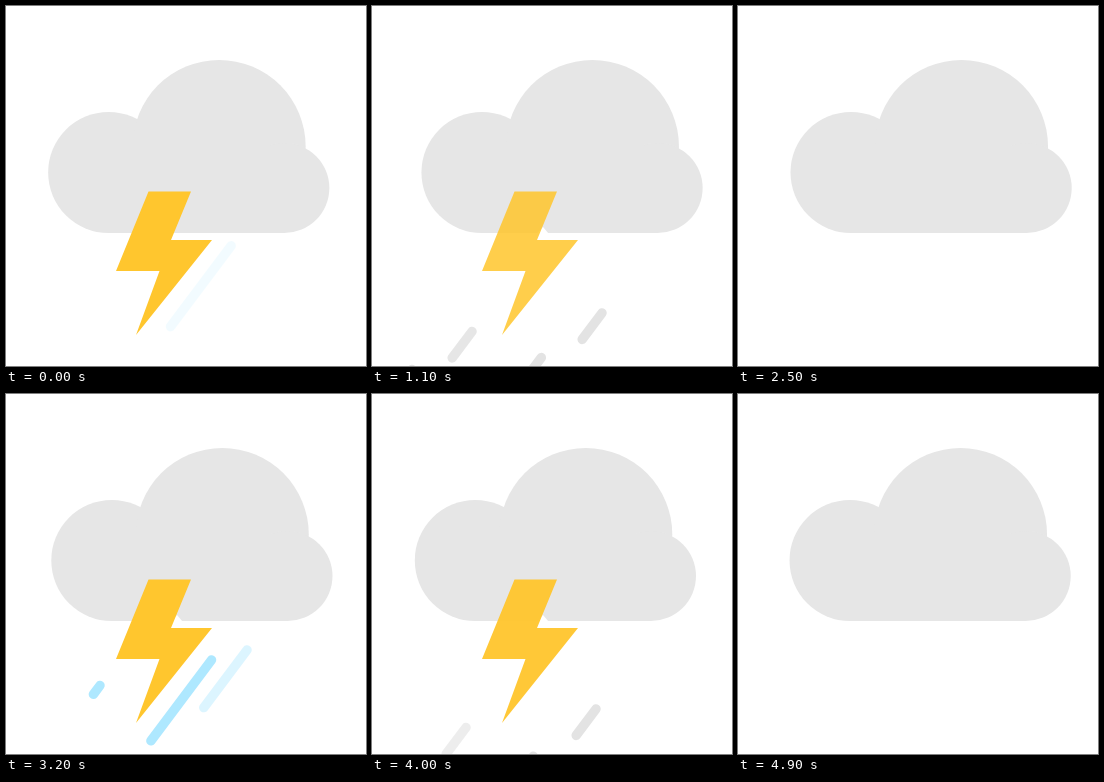
An HTML page that plays this animation: 360x360 px, repeating every 5 s.

```html
<!DOCTYPE html>
<html lang="en">
<head>
<meta charset="utf-8">
<title>Thunderstorm</title>
<style>
  html, body { margin: 0; width: 100%; height: 100%; overflow: hidden; background: #fff; }
  svg { display: block; width: 100vw; height: 100vh; }
</style>
</head>
<body>
<svg viewBox="0 0 360 360">
  <g id="rain" stroke-width="9.5" stroke-linecap="round"></g>
  <g id="cloud" fill="#e6e6e6">
    <circle cx="102.3" cy="166.5" r="60.5"/>
    <circle cx="212.8" cy="140.5" r="86.5"/>
    <circle cx="278" cy="182" r="45"/>
    <path d="M102 140H278V227H102Z"/>
  </g>
  <path id="notch" fill="#fff" d="M171 221L176.5 227.5H165Z"/>
  <path id="bolt" fill="#ffc62e" d="M142.5 185.5H185L165 234H206L130 329L153.500 265H110Z"/>
</svg>
<script>
const LOOP = 5000, STEP = 100, STORM = 2820, SWAY = 3600;
const BLUE = [174, 232, 255], GRAY = [227, 227, 227];
const get = id => document.getElementById(id);
const clamp = v => Math.max(0, Math.min(1, v));
const ramp = (t, a, b) => clamp((t - a) / (b - a));
const mix = (a, b, k) => a + (b - a) * k;

// x, y: upper end at time "at"; the drop fades in from "from"
const drops = [
  { x: 205.5, y: 266, at: 380, len: 101, speed: 0.172, from: -50, fade: 330, easeIn: true },
  { x: 94, y: 291.5, at: 380, len: 11, speed: 0.125, from: 180, fade: 180 },
  { x: 241, y: 256, at: 380, len: 72, speed: 0.166, from: 300, fade: 190 },
  { x: 130, y: 285.5, at: 700, len: 33, speed: 0.125, from: 420, fade: 190, out: [1050, 1400] },
  { x: 260, y: 267, at: 700, len: 33, speed: 0.125, from: 420, fade: 190 }
];
for (const d of drops) {
  d.el = document.createElementNS("http://www.w3.org/2000/svg", "line");
  get("rain").append(d.el);
}

function travel(d, t) {
  const dt = t - d.at;
  if (!d.easeIn || dt >= 0) return d.speed * dt;
  const s = Math.max(0, t);
  return d.speed / 2 * (s * s / d.at - d.at);
}

function drawDrop(d, t, color) {
  const s = travel(d, t);
  const x = d.x - 0.6 * s, y = d.y + 0.8 * s;
  const fadeOut = d.out ? 1 - ramp(t, ...d.out) : 1;
  const pos = { x1: x, y1: y, x2: x - 0.6 * d.len, y2: y + 0.8 * d.len };
  for (const k in pos) d.el.setAttribute(k, pos[k].toFixed(2));
  d.el.setAttribute("stroke", color);
  d.el.setAttribute("opacity", t < 1750 ? ramp(t, d.from, d.from + d.fade) * fadeOut : 0);
}

function sway(t) {
  const p = (t - 150) / SWAY;
  const turn = p - Math.floor(p);
  const line = 1 - Math.abs(1 - 2 * turn);
  const wave = (1 - Math.cos(2 * Math.PI * turn)) / 2;
  return 7.5 * (line + wave) - 0.4;
}

function boltAlpha(t) {
  if (t < 400) return ramp(t, -150, 0);
  if (t < 800) return 1 - ramp(t, 400, 800);
  if (t < 1150) return ramp(t, 800, 1150);
  return 1 - ramp(t, 1150, 1800);
}

function draw(time) {
  const t = Math.floor(time % LOOP / STEP) * STEP;
  const s = t < 2650 ? t : t - STORM;
  const k = ramp(s, 800, 1100);
  const color = `rgb(${BLUE.map((c, i) => Math.round(mix(c, GRAY[i], k)))})`;
  get("cloud").setAttribute("transform", `translate(${sway(t).toFixed(2)} 0)`);
  get("bolt").setAttribute("opacity", boltAlpha(s));
  get("notch").setAttribute("opacity", s > 100 && s < 1800 ? 1 : 0);
  drops.forEach(d => drawDrop(d, s, color));
}

const start = performance.now();
function tick() {
  draw(performance.now() - start);
  requestAnimationFrame(tick);
}
tick();
</script>
</body>
</html>
```
